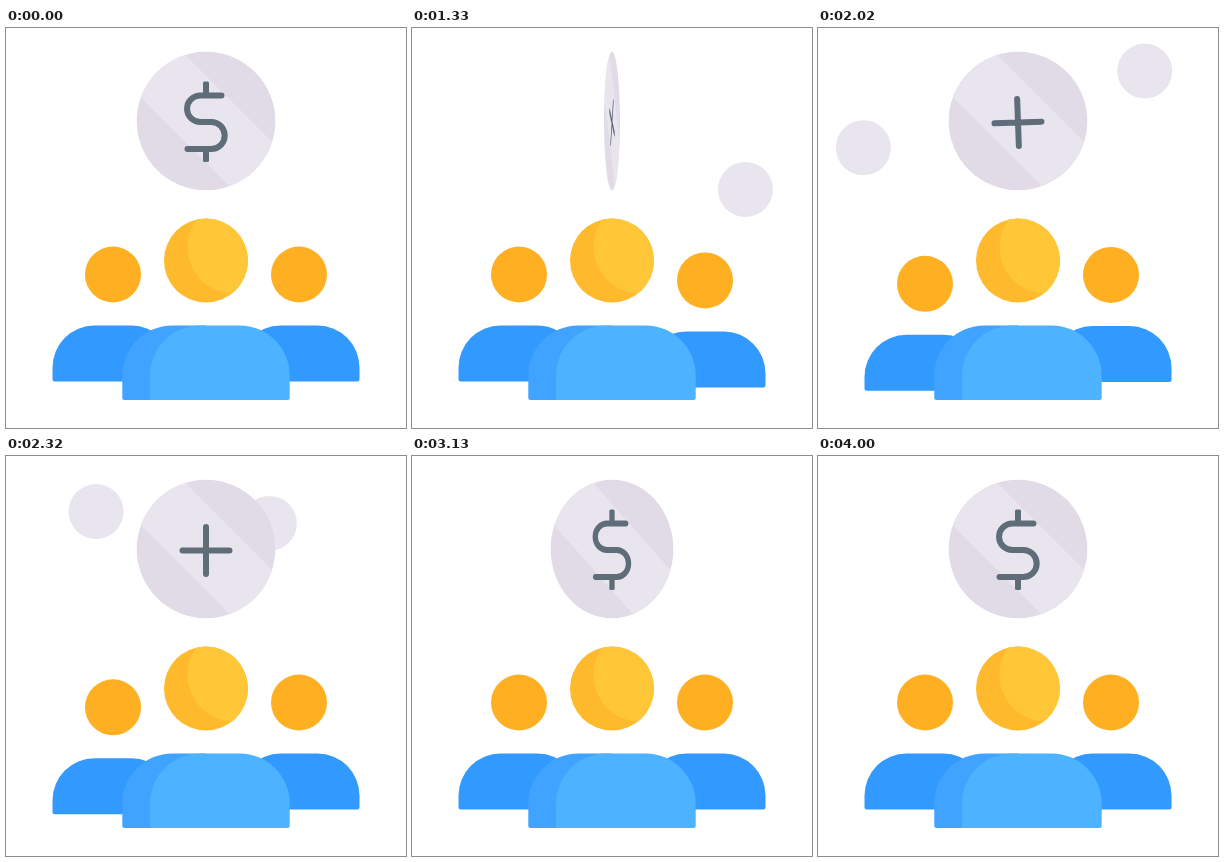
An HTML page for the animation above (4.03 s loop, 400x400 px).

```html
<!DOCTYPE html>
<html lang="en">
<head>
<meta charset="utf-8">
<title>Team funding</title>
<style>
  html, body { margin: 0; width: 100%; height: 100%; overflow: hidden; background: #fff; }
  svg { display: block; width: 100%; height: 100%; }
</style>
</head>
<body>
<svg viewBox="0 0 400 400">
  <defs>
    <clipPath id="coinClip"><circle cx="200" cy="93" r="69.3"/></clipPath>
    <clipPath id="headClip"><circle cx="200" cy="232.5" r="42"/></clipPath>
    <g id="member">
      <circle cx="107" cy="246.5" r="28"/>
      <path d="M46.5 339.5a42 42 0 0 1 42-42h37a42 42 0 0 1 42 42v11.5a2.5 2.5 0 0 1-2.5 2.5H49a2.5 2.5 0 0 1-2.5-2.5z" fill="#3299ff"/>
    </g>
  </defs>

  <g fill="#e9e5ee">
    <circle id="rightCoin" r="27.5"/>
    <circle id="leftCoin" r="27.5"/>
  </g>

  <g fill="#ffb022">
    <g id="left"><use href="#member"/></g>
    <g id="right"><use href="#member" transform="matrix(-1 0 0 1 400 0)"/></g>
  </g>

  <circle cx="200" cy="232.5" r="42" fill="#ffb92c"/>
  <circle cx="228" cy="219" r="46.5" fill="#ffc738" clip-path="url(#headClip)"/>
  <path d="M116.3 347.5a50 50 0 0 1 50-50H200V372H118.3a2 2 0 0 1-2-2z" fill="#40a3ff"/>
  <path d="M144 347.5a50 50 0 0 1 50-50h39.7a50 50 0 0 1 50 50V370a2 2 0 0 1-2 2H144z" fill="#4db2ff"/>

  <g id="bigCoin">
    <circle cx="200" cy="93" r="69.3" fill="#e0dbe6"/>
    <path d="M110 44.5L240 174.5L300 148L160 8z" fill="#e9e5ee" clip-path="url(#coinClip)"/>
    <g id="dollar" fill="none" stroke="#5f6d79" stroke-width="6" stroke-linecap="round">
      <path d="M215.5 67.5H194.3a13.25 13.25 0 0 0 0 26.5H205.2a13.5 13.5 0 0 1 0 27H181.5"/>
      <g fill="#5f6d79" stroke="none">
        <rect x="197" y="53.5" width="6" height="14" rx="1.5"/>
        <rect x="197" y="121" width="6" height="13" rx="1.5"/>
      </g>
    </g>
    <path id="plus" d="M200 71v47M176.5 94.5h47" stroke="#5f6d79" stroke-width="6" stroke-linecap="round"/>
  </g>
</svg>
<script>
const LOOP = 4030;
const $ = id => document.getElementById(id);
const clamp = v => Math.min(1, Math.max(0, v));
const ramp = (t, from, to) => clamp((t - from) / (to - from));

// Waypoints: [time, x, y]
const rightPath = [
  [1030, 293, 246.5], [1570, 361.5, 99], [1780, 365.5, 70],
  [1930, 345, 42], [2020, 327, 43], [2620, 200, 93]
];
const leftPath = [
  [1560, 107, 246.5], [2020, 45.5, 120], [2130, 45, 95],
  [2290, 80, 55], [2620, 200, 93]
];

function slope(path, i, axis) {
  const a = path[Math.max(0, i - 1)];
  const b = path[Math.min(path.length - 1, i + 1)];
  return (b[axis] - a[axis]) / (b[0] - a[0]);
}

// Smooth cubic curve through timed waypoints
function along(path, t, axis) {
  let i = 0;
  while (i < path.length - 2 && t > path[i + 1][0]) i++;
  const a = path[i], b = path[i + 1], span = b[0] - a[0];
  const u = ramp(t, a[0], b[0]), v = 1 - u;
  return a[axis] * v * v * (1 + 2 * u) + b[axis] * u * u * (1 + 2 * v)
    + span * u * v * (slope(path, i, axis) * v - slope(path, i + 1, axis) * u);
}

function moveCoin(coin, path, t, home) {
  const active = t > path[0][0] && t < path[path.length - 1][0];
  coin.setAttribute('visibility', active ? 'visible' : 'hidden');
  coin.setAttribute('cx', along(path, t, 1));
  coin.setAttribute('cy', along(path, t, 2));
}

const dip = (t, start, peak, end) => 10 * Math.min(ramp(t, start, peak), 1 - ramp(t, peak, end));
const drop = (node, y) => node.setAttribute('transform', `translate(0 ${y})`);

const FLIPS = [1300, 2892], HALF_FLIP = 270;

function render(t) {
  moveCoin($('rightCoin'), rightPath, t);
  moveCoin($('leftCoin'), leftPath, t);
  drop($('right'), dip(t, 1030, 1540, 2045));
  drop($('left'), dip(t, 1560, 2055, 2565));

  const width = Math.min(...FLIPS.map(mid => clamp(Math.abs(t - mid) / HALF_FLIP)));
  $('bigCoin').setAttribute('transform', `matrix(${Math.max(width, 0.001)} 0 0 1 ${200 * (1 - width)} 0)`);

  const showPlus = t >= FLIPS[0] && t < FLIPS[1];
  $('plus').setAttribute('visibility', showPlus ? 'visible' : 'hidden');
  $('dollar').setAttribute('visibility', showPlus ? 'hidden' : 'visible');
  $('plus').setAttribute('transform', `rotate(${-90 * (1 - ramp(t, 1000, 2045))} 200 94.5)`);
}

const start = performance.now();
function tick() {
  render((performance.now() - start) % LOOP);
  requestAnimationFrame(tick);
}
tick();
</script>
</body>
</html>
```
